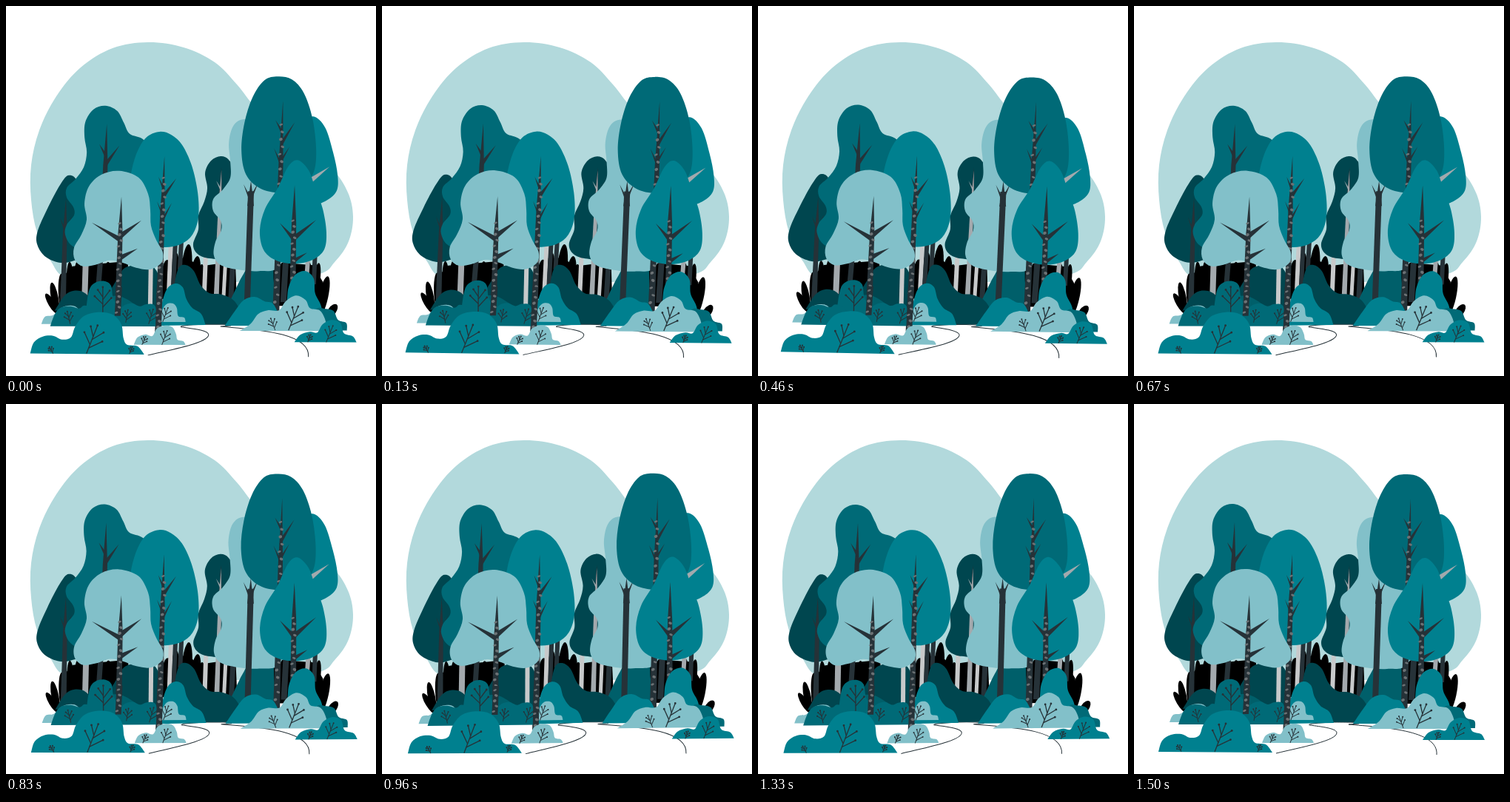
An HTML page with a canvas that plays this animation: 500 px wide and 500 px high, repeating every 1.54 s.

```html
<!DOCTYPE html>
<html lang="en">
<head>
<meta charset="utf-8">
<title>Forest in the wind</title>
<style>
html, body { margin: 0; width: 100%; height: 100%; overflow: hidden; background: #fff; }
canvas { display: block; width: 100vw; height: 100vh; }
</style>
</head>
<body>
<canvas id="stage" width="500" height="500"></canvas>
<script>
const ctx = document.getElementById('stage').getContext('2d');
const LOOP = 1540, LEAD = 40, SWAY = Math.PI / 180;
const PIVOT = { x: 254, y: 285 };
const SKY = '#b2d9dc', TEAL = '#00808f', MID = '#006a77', DEEP = '#005f6a', DARK = '#00464f',
      LIGHT = '#82c0c9', BARK = '#263238', ASH = '#a3a9ad', PALE = '#c7c9ca', SPOT = '#6c7275';

// Catmull-Rom curve through flat x, y pairs; a flat shape closes with a straight base.
function shape(color, pts, flat = false) {
  const n = pts.length / 2;
  const at = i => {
    const k = flat ? Math.max(0, Math.min(n - 1, i)) : (i + n) % n;
    return [pts[2 * k], pts[2 * k + 1]];
  };
  ctx.beginPath();
  ctx.moveTo(...at(0));
  for (let i = 0; i < (flat ? n - 1 : n); i++) {
    const [a, b, c, d] = [at(i - 1), at(i), at(i + 1), at(i + 2)];
    ctx.bezierCurveTo(b[0] + (c[0] - a[0]) / 6, b[1] + (c[1] - a[1]) / 6,
      c[0] - (d[0] - b[0]) / 6, c[1] - (d[1] - b[1]) / 6, c[0], c[1]);
  }
  ctx.closePath();
  ctx.fillStyle = color;
  ctx.fill();
}
const bush = (color, ...pts) => shape(color, pts, true);
const crown = (color, ...pts) => shape(color, pts);

function poly(color, ...pts) {
  ctx.beginPath();
  for (let i = 0; i < pts.length; i += 2) ctx.lineTo(pts[i], pts[i + 1]);
  ctx.closePath();
  ctx.fillStyle = color;
  ctx.fill();
}

function oval(color, x, y, rx, ry, angle = 0) {
  ctx.beginPath();
  ctx.ellipse(x, y, rx, ry, angle, 0, 2 * Math.PI);
  ctx.fillStyle = color;
  ctx.fill();
}

function leaf(x, y, tipX, tipY, width) {
  const dx = tipX - x, dy = tipY - y;
  oval('#000', x + dx / 2, y + dy / 2, Math.hypot(dx, dy) / 2, width / 2, Math.atan2(dy, dx));
}

function pole(color, x, y, baseX, baseY, w) {
  poly(color, x - w / 2, y, x + w / 2, y, baseX + w / 2, baseY, baseX - w / 2, baseY);
}

function trunk(color, x, y, baseX, baseY, w) {
  const mx = x + (baseX - x) * 0.3, my = y + (baseY - y) * 0.3;
  poly(color, x, y, mx + w * 0.34, my, baseX + w / 2, baseY, baseX - w / 2, baseY, mx - w * 0.34, my);
}

function branch(color, tipX, tipY, x, y, w = 7) {
  poly(color, tipX, tipY, x, y - w / 2, x, y + w / 2);
}

function spots(x, y, baseX, baseY, w, count) {
  for (let i = 0; i < count; i++) {
    const k = (i + 0.5) / count, side = i % 2 ? 1 : -1;
    oval(SPOT, x + (baseX - x) * k + side * w * (0.16 + 0.08 * Math.sin(i * 5)),
      y + (baseY - y) * k, w * 0.3, 1.3 + 0.7 * Math.sin(i * 2.3) ** 2, side * 0.35);
  }
}

function twig(x, y, tipX, tipY) {
  const dx = tipX - x, dy = tipY - y, size = Math.hypot(dx, dy);
  const dot = size > 25 ? 1.4 : 1;
  ctx.strokeStyle = BARK;
  ctx.lineWidth = size > 25 ? 1.3 : 1;
  const line = (x0, y0, x1, y1) => {
    ctx.beginPath();
    ctx.moveTo(x0, y0);
    ctx.lineTo(x1, y1);
    ctx.stroke();
    oval(BARK, x1, y1, dot, dot);
  };
  line(x, y, tipX, tipY);
  for (const [k, turn, length] of [[0.2, 0.75, 0.5], [0.32, -0.8, 0.45], [0.5, 0.65, 0.45], [0.6, -0.6, 0.35]]) {
    const a = Math.atan2(dy, dx) + turn;
    const sx = x + dx * k, sy = y + dy * k;
    line(sx, sy, sx + Math.cos(a) * size * length, sy + Math.sin(a) * size * length);
  }
}

function backdrop() {
  crown(SKY, 192, 49, 240, 56, 282, 76, 312, 106, 340, 140, 390, 183, 440, 220, 462, 252, 469, 285,
    463, 318, 445, 345, 420, 363, 330, 372, 200, 376, 90, 370, 60, 344, 42, 306, 34, 262,
    34, 215, 45, 168, 68, 122, 101, 83, 144, 57);
}

function undergrowth() {
  poly('#000', 77, 366, 90, 352, 165, 345, 165, 405, 77, 405);
  for (const [x, y, w] of [[54, 389, 9], [62, 374, 10], [75, 362, 11], [86, 346, 11], [97, 345, 13],
    [115, 346, 14], [138, 346, 14]]) leaf(Math.max(70, x + 3), 416, x, y, w);
  poly('#000', 208, 358, 220, 342, 246, 340, 260, 352, 310, 345, 312, 396, 208, 396);
  for (const [x, y, w] of [[218, 343, 12], [230, 333, 12], [247, 322, 14], [259, 338, 13], [265, 349, 10]])
    leaf(x - 6, 390, x, y, w);
  poly('#000', 355, 345, 415, 350, 428, 372, 430, 405, 355, 405);
  for (const [x, y, w] of [[410, 346, 13], [423, 347, 12], [435, 365, 13], [447, 403, 11]])
    leaf(x - 12, 420, x, y, w);
}

function distantTrunks() {
  pole(BARK, 128, 340, 124, 392, 7);
  bush(DARK, 125, 412, 150, 370, 163, 353, 195, 350, 209, 372, 212, 412);
  pole(ASH, 108, 340, 106, 412, 8);
  pole(PALE, 196, 340, 195, 412, 6);
  pole(PALE, 223, 318, 220, 392, 6);
  pole(BARK, 229, 318, 226, 382, 6);
  pole(BARK, 237, 318, 235, 356, 6);
  pole(PALE, 270, 338, 268, 392, 6);
  pole(PALE, 297, 340, 294, 396, 5);
  pole(BARK, 307, 340, 304, 396, 7);
  pole(ASH, 409, 330, 406, 372, 6);
  pole(BARK, 418, 330, 416, 376, 6);
  bush(DEEP, 296, 414, 308, 388, 320, 364, 330, 352, 358, 350, 362, 372, 364, 414);
}

function leftTrees() {
  crown(DARK, 85, 229, 73, 242, 56, 274, 43, 304, 42, 322, 52, 338, 72, 347, 90, 345, 108, 335, 115, 290, 98, 240);
  trunk(BARK, 81, 260, 77, 410, 8);
  branch(BARK, 73, 286, 79, 302, 6);
  branch(BARK, 89, 284, 80, 305, 6);

  crown(MID, 134, 135, 118, 140, 107, 157, 106, 178, 109, 198, 105, 218, 94, 234, 82, 246, 82, 259,
    91, 272, 92, 283, 82, 296, 80, 309, 89, 324, 112, 333, 160, 332, 205, 300, 205, 205, 186, 181,
    167, 173, 159, 158, 150, 142);
  trunk(BARK, 136, 160, 130, 345, 9);
  branch(BARK, 126, 187, 134, 202, 8);
  branch(BARK, 153, 189, 135, 214, 9);

  crown(TEAL, 207, 170, 189, 178, 176, 200, 168, 232, 166, 270, 176, 303, 192, 320, 213, 326, 236, 322,
    252, 309, 260, 285, 259, 252, 251, 216, 238, 188, 223, 174);
  trunk(BARK, 214, 203, 206, 440, 9);
  branch(BARK, 206, 231, 212, 246, 7);
  branch(BARK, 230, 233, 214, 256, 8);
  branch(BARK, 204, 264, 212, 284, 7);
  branch(BARK, 224, 266, 212, 289, 7);
  spots(214, 228, 206, 436, 8, 24);

  crown(LIGHT, 153, 223, 129, 228, 112, 244, 106, 267, 109, 289, 102, 309, 92, 327, 93, 343, 104, 352,
    121, 350, 140, 344, 157, 347, 176, 354, 195, 356, 210, 347, 212, 333, 203, 316, 196, 297, 195, 276,
    192, 254, 179, 232);
  trunk(BARK, 156, 258, 151, 424, 9);
  branch(BARK, 116, 293, 154, 316, 8);
  branch(BARK, 183, 290, 155, 311, 9);
  branch(BARK, 178, 328, 154, 341, 8);
  spots(155, 290, 151, 422, 8, 17);
}

function rightTrees() {
  crown(DARK, 290, 203, 277, 209, 269, 225, 272, 246, 268, 264, 260, 283, 260, 302, 253, 322, 259, 335,
    275, 341, 298, 338, 310, 300, 306, 225, 301, 208);
  trunk(BARK, 291, 218, 288, 300, 4);
  trunk(ASH, 291, 222, 284, 403, 7);
  branch(ASH, 284, 236, 290, 248, 5);
  branch(ASH, 302, 236, 290, 256, 5);

  crown(LIGHT, 322, 153, 307, 162, 301, 185, 303, 210, 303, 232, 293, 248, 280, 261, 280, 277, 290, 290,
    291, 303, 283, 319, 281, 337, 290, 350, 312, 356, 342, 358, 370, 351, 384, 300, 375, 210, 347, 162);
  pole(BARK, 331, 250, 326, 404, 8);
  poly(BARK, 331, 236, 335, 270, 326, 270);
  branch(BARK, 321, 241, 330, 262, 9);
  branch(BARK, 341, 238, 330, 262, 9);

  crown(TEAL, 415, 149, 398, 160, 390, 200, 394, 250, 415, 267, 434, 262, 447, 249, 448, 228, 442, 198, 431, 164);
  branch(ASH, 437, 217, 410, 237, 9);

  pole(BARK, 379, 330, 375, 400, 8);
  crown(MID, 367, 95, 349, 100, 333, 123, 322, 158, 318, 195, 324, 227, 343, 246, 370, 252, 397, 246,
    415, 226, 419, 195, 414, 152, 402, 117, 386, 99);
  trunk(BARK, 374, 128, 365, 414, 9);
  branch(BARK, 364, 154, 372, 169, 7);
  branch(BARK, 390, 157, 372, 186, 9);
  branch(BARK, 362, 192, 370, 211, 7);
  branch(BARK, 383, 190, 370, 212, 7);
  spots(373, 155, 365, 405, 8, 25);

  crown(TEAL, 394, 208, 381, 217, 367, 246, 350, 274, 343, 303, 348, 329, 364, 343, 389, 348, 414, 343,
    430, 329, 433, 305, 428, 274, 419, 250, 409, 222);
  trunk(BARK, 390, 242, 387, 412, 9);
  branch(BARK, 370, 293, 387, 313, 8);
  branch(BARK, 419, 289, 389, 314, 9);
  branch(BARK, 407, 333, 388, 345, 7);
  spots(389, 286, 387, 402, 8, 15);
}

function bushes() {
  bush(DARK, 218, 430, 226, 385, 233, 355, 243, 350, 254, 358, 263, 377, 275, 388, 292, 390, 310, 400, 325, 430);
  bush(TEAL, 296, 432, 309, 413, 322, 397, 337, 393, 350, 399, 361, 402, 370, 420, 372, 432);
  bush(TEAL, 370, 430, 379, 403, 382, 380, 391, 363, 405, 358, 416, 368, 418, 388, 426, 405, 430, 430);
  bush(MID, 410, 438, 419, 410, 432, 409, 443, 412, 449, 424, 460, 428, 461, 438);

  bush(DARK, 66, 412, 79, 392, 92, 385, 108, 389, 125, 410);
  bush(LIGHT, 48, 430, 53, 420, 64, 418, 75, 408, 88, 405, 98, 410, 105, 430);
  bush(DEEP, 112, 430, 120, 400, 150, 392, 175, 404, 205, 430);
  bush(MID, 106, 432, 109, 405, 113, 383, 121, 374, 133, 372, 142, 378, 145, 395, 153, 410, 160, 432);
  bush(MID, 60, 433, 66, 417, 74, 408, 87, 406, 99, 409, 106, 405, 118, 409, 126, 422, 138, 415, 150, 418,
    158, 406, 170, 402, 181, 406, 190, 403, 202, 406, 206, 433);
  twig(131, 414, 131, 380);
  twig(87, 430, 83, 413);
  twig(162, 428, 165, 411);
  twig(193, 430, 199, 410);
  bush(TEAL, 207, 432, 211, 402, 218, 382, 229, 375, 239, 380, 244, 396, 252, 408, 264, 416, 270, 431);
  bush(LIGHT, 208, 427, 211, 412, 217, 403, 226, 402, 231, 408, 233, 419, 241, 421, 243, 427);
  twig(212, 427, 219, 408);

  // the foreground stems stay in front of the low shrubs
  pole(BARK, 208, 380, 206, 440, 8);
  spots(208, 382, 206, 438, 8, 7);
  pole(BARK, 153, 380, 151, 419, 8);
  spots(153, 382, 151, 418, 8, 5);

  bush(LIGHT, 173, 458, 178, 448, 188, 444, 198, 446, 204, 436, 214, 432, 225, 434, 230, 443, 232, 451, 240, 453, 243, 458);
  twig(211, 458, 218, 439);
  twig(184, 458, 189, 447);

  bush(TEAL, 33, 470, 38, 455, 50, 447, 64, 446, 76, 451, 88, 448, 94, 433, 106, 419, 125, 414, 144, 417,
    156, 430, 159, 449, 164, 458, 178, 460, 187, 471);
  twig(109, 470, 124, 432);
  twig(64, 470, 59, 461);
  twig(167, 470, 171, 461);

  bush(LIGHT, 316, 439, 331, 429, 341, 416, 354, 411, 369, 411, 378, 399, 392, 391, 405, 397, 411, 408,
    424, 411, 431, 422, 435, 439);
  twig(382, 438, 395, 406);
  twig(364, 438, 358, 422);
  bush(TEAL, 390, 454, 398, 444, 411, 440, 421, 441, 428, 430, 440, 424, 452, 428, 457, 442, 469, 446, 474, 454);
  twig(433, 454, 442, 432);
  twig(408, 454, 412, 444);
}

function footpath() {
  ctx.strokeStyle = BARK;
  ctx.lineWidth = 1;
  ctx.beginPath();
  ctx.moveTo(268, 430);
  ctx.bezierCurveTo(245, 431, 232, 433, 238, 434);
  ctx.bezierCurveTo(252, 436, 273, 438, 274, 444);
  ctx.bezierCurveTo(275, 455, 225, 464, 192, 472);
  ctx.moveTo(268, 430);
  ctx.bezierCurveTo(285, 430, 305, 430, 304, 432);
  ctx.lineTo(290, 433);
  ctx.bezierCurveTo(335, 437, 412, 440, 409, 474);
  ctx.stroke();
}

// Linear swing: 0 at the start, +1 at a quarter, -1 at three quarters.
function swing(p) {
  return p < 0.25 ? 4 * p : p < 0.75 ? 2 - 4 * p : 4 * p - 4;
}

function draw(time) {
  ctx.fillStyle = '#fff';
  ctx.fillRect(0, 0, 500, 500);
  backdrop();
  ctx.save();
  ctx.translate(PIVOT.x, PIVOT.y);
  ctx.rotate(SWAY * swing((time + LEAD) % LOOP / LOOP));
  ctx.translate(-PIVOT.x, -PIVOT.y);
  undergrowth();
  distantTrunks();
  leftTrees();
  rightTrees();
  footpath();
  bushes();
  ctx.restore();
}

let start;
function tick(now) {
  start ??= now;
  draw(now - start);
  requestAnimationFrame(tick);
}
draw(0);
requestAnimationFrame(tick);
</script>
</body>
</html>
```
